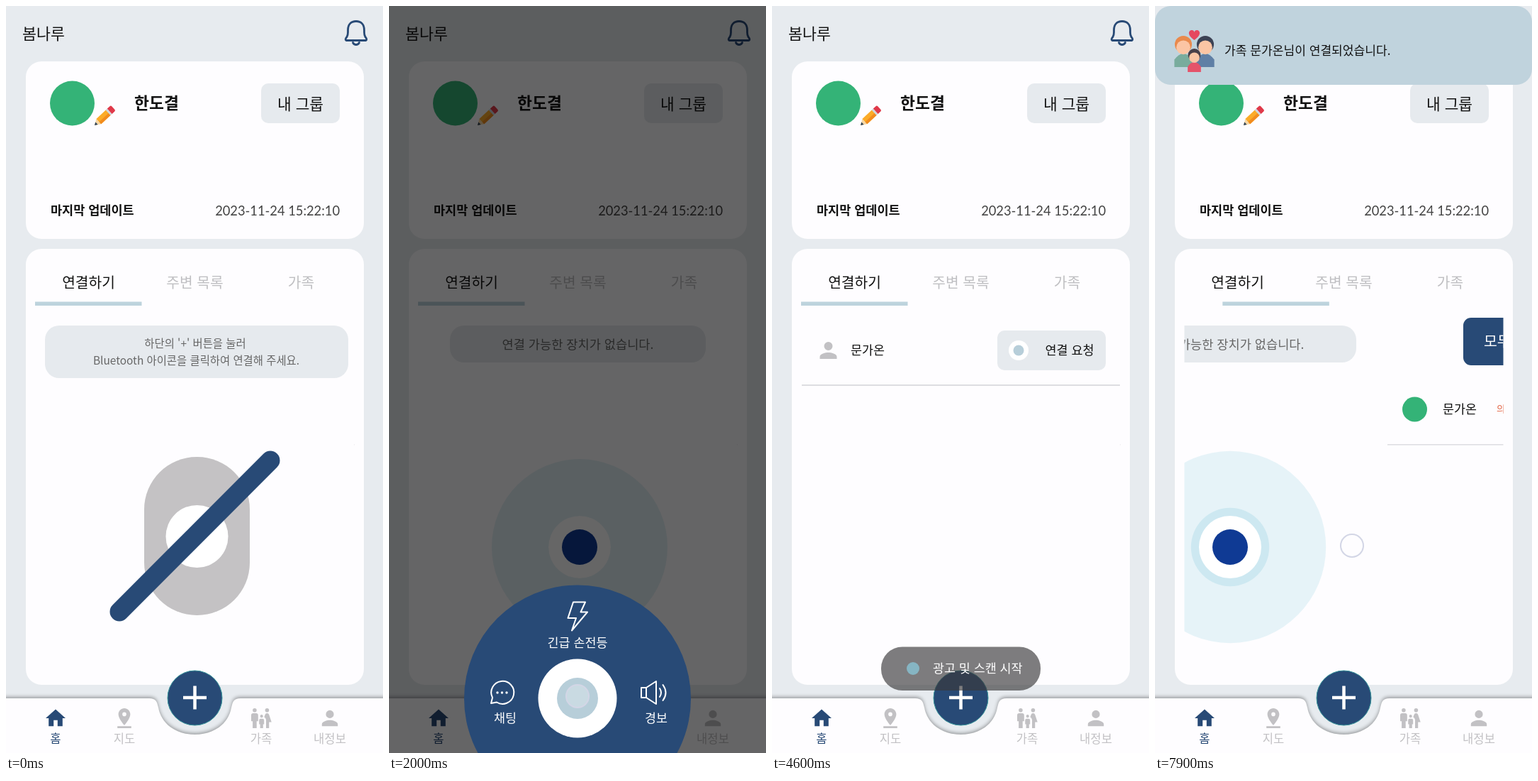
An HTML page for the animation above (8 s loop, 532 by 1052 pixels).

```html
<!DOCTYPE html>
<html lang="ko">
<head>
<meta charset="utf-8">
<style>
  html, body { margin: 0; width: 100%; height: 100%; overflow: hidden; background: #e7ebef; }
  svg { display: block; width: 532px; height: 1052px; }
  text { font-family: 'Noto Sans CJK KR', 'Noto Sans CJK', sans-serif; white-space: pre; }
  .date text { font-family: Lato, sans-serif; }
</style>
</head>
<body>
<svg id="stage" viewBox="0 0 532 1052"></svg>
<script>
const NAVY = '#284a76', GRAY = '#c2c1c4', PALE = '#b7ced9', SOFT = '#e6eaee', GREEN = '#34b377', CARD = '#fefdff';

// y is the optical middle of the line
const text = (x, y, size, str, fill = '#111', anchor = 'start', weight = 400) =>
  `<text x="${x}" y="${y + size * .37}" font-size="${size}" fill="${fill}" text-anchor="${anchor}" font-weight="${weight}">${str}</text>`;
const mid = (x, y, size, str, fill) => text(x, y, size, str, fill, 'middle');
const box = (x, y, x2, y2, r, fill, more = '') =>
  `<rect x="${x}" y="${y}" width="${x2 - x}" height="${y2 - y}" rx="${r}" fill="${fill}" ${more}/>`;
const disc = (x, y, r, fill, more = '') => `<circle cx="${x}" cy="${y}" r="${r}" fill="${fill}" ${more}/>`;
const icon = (x, y, scale, d, fill) =>
  `<path transform="translate(${x} ${y}) scale(${scale}) translate(-12 -12)" d="${d}" fill="${fill}" fill-rule="evenodd"/>`;
const group = (id, body, more = '') => `<g id="${id}" ${more}>${body}</g>`;

const HOME = 'M10 20v-6h4v6h5v-8h3L12 3 2 12h3v8z';
const PIN = 'M18 8c0-3.3-2.7-6-6-6S6 4.7 6 8c0 4.5 6 11 6 11s6-6.5 6-11zm-8 0a2 2 0 1 1 4 0 2 2 0 0 1-4 0zM5 20v2h14v-2z';
const PERSON = 'M12 12a4 4 0 1 0 0-8 4 4 0 0 0 0 8zm0 2c-2.7 0-8 1.3-8 4v2h16v-2c0-2.7-5.3-4-8-4z';
const FAMILY = 'M16 4a2 2 0 1 1 4 0 2 2 0 0 1-4 0zm4 18v-6h2.5L20 8.4A2 2 0 0 0 18 7a2 2 0 0 0-2 1.4l-.9 2.5c1.1.6 1.9 1.8 1.9 3.1v8z'
  + 'M12.5 11.5a1.5 1.5 0 1 0 0-3 1.5 1.5 0 0 0 0 3zM5.5 6a2 2 0 1 0 0-4 2 2 0 0 0 0 4zm2 16v-7H9V9a2 2 0 0 0-2-2H4a2 2 0 0 0-2 2v6h1.5v7z'
  + 'M14 22v-4h1v-4a1.5 1.5 0 0 0-1.5-1.5h-2A1.5 1.5 0 0 0 10 14v4h1v4z';

const header = text(23, 39, 21.7, '봄나루')
  + `<g fill="none" stroke="${NAVY}" stroke-width="2.8" stroke-linejoin="round" stroke-linecap="round">
      <path d="M480 48.500H508Q510 47 507 43.500Q505.500 41 505.500 37V34C505.500 26 501 21.500 494 21.500S482.500 26 482.500 34V37Q482.500 41 481 43.500Q478 47 480 48.500Z"/>
      <path d="M489.500 51.500Q491 54.500 494 54.500T498.500 51.500"/></g>`;

const pencil = `<g transform="translate(125 168) rotate(-43)">
    <path d="M0 0L8-5V5Z" fill="#f6d6a4"/><path d="M0 0L4-2.500V2.500Z" fill="#2f4356"/>
    <path d="M8-5H27V5H8Z" fill="#fbab28"/><path d="M8 1H27V5H8Z" fill="#f28c1e"/>
    <path d="M26-5H29V5H26Z" fill="#cfd6dc"/><path d="M29-5H34Q36-5 36-3V3Q36 5 34 5H29Z" fill="#e0394a"/></g>`;

const profile = box(28, 78, 505, 328, 22, CARD) + disc(93.5, 137, 31.5, GREEN) + pencil
  + text(181, 137, 22.8, '한도결', '#111', 'start', 600)
  + box(360, 109, 471, 165, 10, SOFT) + text(415.5, 138, 21.4, '내 그룹', '#111', 'middle', 500)
  + text(63, 288, 17.5, '마지막 업데이트', '#111', 'start', 600)
  + `<g class="date">${text(471, 288, 18.3, '2023-11-24 15:22:10', '#444', 'end')}</g>`;

const tabs = mid(116.5, 389, 20.3, '연결하기') + mid(266.5, 389, 20.3, '주변 목록', '#bfbfc2')
  + mid(416.5, 389, 20.3, '가족', '#bfbfc2') + box(41, 416.5, 191.5, 422, 0, '#bdd3dd', 'id="bar"');

const offPage = box(55, 450, 483, 524, 20, SOFT)
  + mid(267, 475, 15.4, "하단의 '+' 버튼을 눌러", '#666')
  + mid(268.5, 499, 15.4, 'Bluetooth 아이콘을 클릭하여 연결해 주세요.', '#666')
  + box(195, 635, 344, 858, 74, '#c4c2c4') + disc(269.5, 747, 44, '#fff')
  + `<path d="M373 640L160 853" stroke="${NAVY}" stroke-width="27" stroke-linecap="round"/>`;

const scanPage = box(86, 450, 447, 502, 20, SOFT)
  + mid(266.5, 476, 17.6, '연결 가능한 장치가 없습니다.', '#666')
  + disc(269, 762, 0, '#cce8f1', 'id="ring1"') + disc(269, 762, 0, '#cce8f1', 'id="ring0"')
  + disc(269, 762, 44, '#fff') + disc(269, 762, 25, '#0f3a94');

const listPage = icon(79.5, 485, 1.5, PERSON, GRAY) + text(111, 485, 17.4, '문가온')
  + box(318, 457, 471, 513, 10, SOFT, 'id="linkBox"') + disc(348, 485, 14, '#fff') + disc(348, 485, 7.5, PALE)
  + group('ask', mid(420, 485, 17.4, '연결 요청')) + group('cut', mid(420, 485, 17.4, '연결 끊기', '#fff'))
  + box(42, 533, 491, 535, 0, '#dddde1');

// second page, one page width to the right
const nextPage = box(598, 439, 835, 506, 11, NAVY) + text(627, 472, 20.5, '모두에게 알림 보내기', '#fff')
  + disc(529.5, 568, 17.5, GREEN) + text(569, 568, 17.4, '문가온') + text(645, 567, 13, '의심 거리', '#e2603f')
  + box(491, 617, 940, 618.5, 0, '#dddde1');

const nav = `<path d="M-9 975H202C212 975 213 980 215 988C219 1011 240 1026 266.500 1026S314 1011 318 988C320 980 321 975 331 975H541V1062H-9Z"
    fill="${CARD}" style="filter:drop-shadow(0 -2px 2.500px #0005)"/>`
  + [[70, HOME, '홈', NAVY], [167, PIN, '지도', GRAY], [360, FAMILY, '가족', GRAY], [457, PERSON, '내정보', GRAY]]
    .map(([x, d, label, c]) => icon(x, 1003, 1.4, d, c) + mid(x, 1032, 16.6, label, c)).join('')
  + disc(266.5, 974.5, 38.5, NAVY, 'stroke="#36949a"')
  + '<path d="M250 974H283M266.500 957.500V990.500" stroke="#fff" stroke-width="4.500"/>';

const toast = box(154, 902.5, 379, 964, 30, '#3a3839', 'opacity=".65"')
  + disc(199, 933, 9, '#86b5c3') + text(227, 933, 17.4, '광고 및 스캔 시작', '#fff');

const wheel = disc(266, 975.5, 160, NAVY) + disc(266, 975, 55.5, '#fff') + disc(266, 975, 29, PALE)
  + `<g fill="none" stroke="#fff" stroke-width="2" stroke-linejoin="round" stroke-linecap="round">
      <path d="M260 839.500H277L270.500 853.500H280L258 879.500L264 862H252.500Z"/>
      <path d="M144 982L146 974A16 16 0 1 1 152 980.500Z"/>
      <path d="M356 960H363L377 951V983L363 974H356ZM363 960V974M382 961Q386 967 382 973M386.500 956Q394.500 967 386.500 978"/></g>`
  + [153, 159.5, 166].map(x => disc(x, 967, 1.7, '#fff')).join('')
  + mid(266, 897, 17.4, '긴급 손전등', '#fff') + mid(164, 1003, 17.4, '채팅', '#fff') + mid(377, 1003, 17.4, '경보', '#fff');

const person = (x, y, r, hair, shirt) =>
  `<path d="M${x - r * 1.1} ${y + r * 2.6}V${y + r * 1.7}Q${x} ${y + r * .2} ${x + r * 1.1} ${y + r * 1.7}V${y + r * 2.6}Z" fill="${shirt}"/>`
  + disc(x, y - 2, r * 1.05, hair) + disc(x, y + r * .2, r * .86, '#fbc5a4');
const notice = box(0, 0, 532, 111, 22, '#c0d3dd')
  + '<path d="M55.500 48C44 40 48 34 52 34Q55 34 55.500 37Q56 34 59 34C63 34 67 40 55.500 48Z" fill="#e5475f"/>'
  + person(40, 56, 11.5, '#e98a4d', '#79ac9d') + person(71, 56, 11.5, '#3c4254', '#5f7fa5') + person(55.5, 71, 8.5, '#493f48', '#e5536a')
  + text(98, 63, 17.1, '가족 문가온님이 연결되었습니다.');

stage.innerHTML = `<clipPath id="view"><rect x="41.500" y="430" width="450" height="525"/></clipPath>
  <clipPath id="screen"><rect width="532" height="1052"/></clipPath>`
  + box(0, 0, 532, 1052, 0, '#e7ebef') + header + profile + box(28, 342, 505, 956, 22, CARD) + tabs
  + `<g clip-path="url(#view)">`
  + group('pages', group('off', offPage) + group('scan', scanPage) + group('list', listPage) + nextPage) + '</g>'
  + nav + group('toast', toast) + box(0, 0, 532, 1052, 0, '#000', 'id="scrim"')
  + group('wheel', wheel, 'clip-path="url(#screen)"') + group('notice', notice)
  + disc(0, 0, 16, '#ffffff40', 'id="touch" stroke="#d3d6e6" stroke-width="2"');

const $ = id => document.getElementById(id);
const set = (id, attrs) => { for (const k in attrs) $(id).setAttribute(k, attrs[k]); };
const show = (id, on) => set(id, { visibility: on ? 'visible' : 'hidden' });
const ramp = (t, a, b) => Math.min(1, Math.max(0, (t - a) / (b - a)));

function draw(t) {
  // menu
  const open = ramp(t, 760, 1060) - ramp(t, 2010, 2180);
  const size = .226 + .774 * open;
  set('scrim', { opacity: .6 * open });
  set('wheel', { opacity: Math.min(1, open * 1.15), transform: `translate(266 941) scale(${size}) translate(-266 -941)` });
  show('wheel', open > 0);

  // first page
  const state = t < 1700 ? 'off' : t < 2900 || t >= 7200 ? 'scan' : 'list';
  for (const id of ['off', 'scan', 'list']) show(id, id === state);
  const phase = ((t - (t < 5000 ? 2000 : 7760)) / 1000 % 1 + 1) % 1;
  for (const k of [0, 1]) {
    const age = phase + k;
    set('ring' + k, { r: 44 + 80 * age, opacity: 1 - age * .45 });
  }
  const linked = t >= 6000;
  set('linkBox', { fill: linked ? NAVY : SOFT });
  show('ask', state === 'list' && !linked);
  show('cut', state === 'list' && linked);

  // swipe
  const shift = 163 * (Math.max(0, t - 7650) / 250) ** 2;
  set('pages', { transform: `translate(${-shift})` });
  set('bar', { x: 41 + shift / 3 });

  set('toast', { opacity: ramp(t, 2100, 2225) - ramp(t, 5200, 5450) });
  set('notice', { transform: `translate(0 ${-112 * (1 - ramp(t, 7000, 7300)) ** 3})` });

  const touches = [[600, 760, 266, 974], [1880, 2080, 266, 972], [5650, 5900, 395, 485], [7600, 8000, 441 - shift, 760]];
  const now = touches.find(([a, b]) => t >= a && t < b);
  show('touch', now);
  if (now) set('touch', { cx: now[2], cy: now[3] });
}

// the picture advances ten times a second
const STEP = 100;
function tick() {
  draw(Math.floor(performance.now() % 8000 / STEP) * STEP);
  requestAnimationFrame(tick);
}
tick();
</script>
</body>
</html>
```
